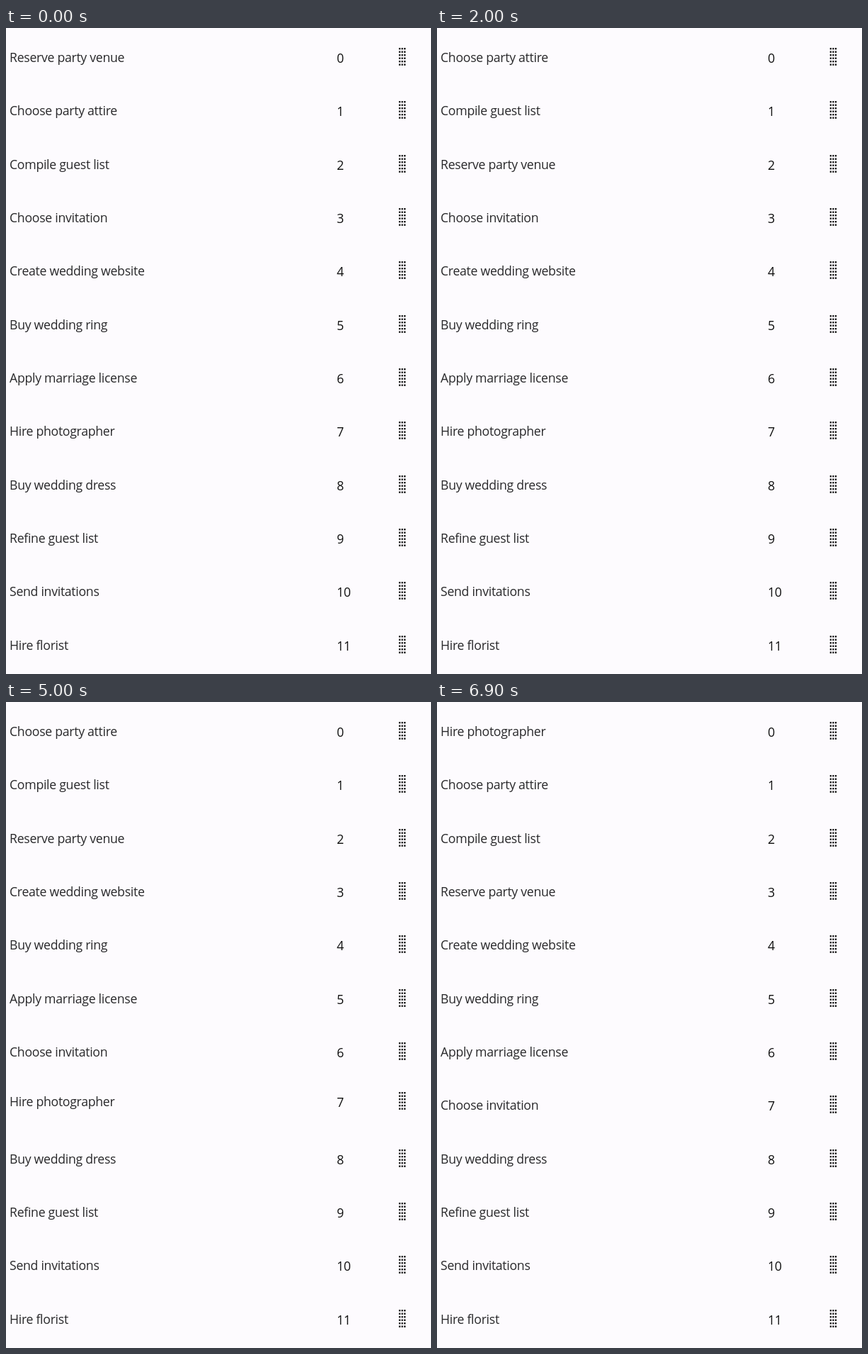
An HTML page with a canvas for the animation above (7600 ms loop, 600x911 px).

```html
<!DOCTYPE html>
<html lang="en">
<head>
<meta charset="utf-8">
<title>Reorderable task list</title>
<style>
  html, body { margin: 0; width: 100%; height: 100%; overflow: hidden; background: #fdfbfe; }
  canvas { display: block; }
</style>
</head>
<body>
<canvas id="stage" width="600" height="911"></canvas>
<script>
const ctx = document.getElementById('stage').getContext('2d');
const LOOP = 7600, TICK = 100, SHIFT_MS = 200;
const TOP = 42, PITCH = 75.32, LIFT = -5;

const TASKS = [
  'Reserve party venue', 'Choose party attire', 'Compile guest list',
  'Choose invitation', 'Create wedding website', 'Buy wedding ring',
  'Apply marriage license', 'Hire photographer', 'Buy wedding dress',
  'Refine guest list', 'Send invitations', 'Hire florist'
];

// path: row centre at each tick from `move`; swaps: when each neighbour gives way
const DRAGS = [
  { from: 0, dir: 1, lift: 1000, move: 1200, drop: 2000,
    path: [62, 98, 130, 154, 172, 185, 194, 198.5],
    swaps: [1250, 1510] },
  { from: 3, dir: 1, lift: 2700, move: 3100, drop: 3900,
    path: [285, 314, 352, 395, 430, 454, 465, 468.5],
    swaps: [3180, 3370, 3642] },
  { from: 7, dir: -1, lift: 5000, move: 5200, drop: 6900,
    path: [542, 495, 412, 352, 318, 241, 192, 150, 128, 112, 98, 86, 74, 64, 55, 48],
    swaps: [5225, 5350, 5450, 5663, 5700, 5850, 6350] }
];

const rowY = slot => TOP + slot * PITCH;

function ease(p) {
  const s = Math.min(1, Math.max(0, p));
  return s * s * (3 - 2 * s);
}

function dragY(drag, t) {
  if (t < drag.move) return rowY(drag.from) + LIFT;
  const step = Math.floor((t - drag.move) / TICK);
  return drag.path[Math.min(step, drag.path.length - 1)];
}

function layout(t) {
  const order = TASKS.slice();
  let active = null;
  for (const drag of DRAGS) {
    if (t >= drag.drop) {
      const [task] = order.splice(drag.from, 1);
      order.splice(drag.from + drag.dir * drag.swaps.length, 0, task);
    } else if (t >= drag.lift) {
      active = drag;
    }
  }
  const rows = order.map((task, i) => ({ task, number: i, y: rowY(i) }));
  if (active) {
    const { from, dir, swaps } = active;
    rows[from].y = dragY(active, t);
    swaps.forEach((start, k) => {
      rows[from + dir * (k + 1)].y -= dir * PITCH * ease((t - start) / SHIFT_MS);
    });
  }
  return rows;
}

function drawHandle(y) {
  const top = Math.round(y) - 14;
  for (let col = 0; col < 3; col++) {
    for (let row = 0; row < 6; row++) {
      ctx.fillRect(554.7 + col * 3.6, top + row * 4.5, 2.2, 2.4);
    }
  }
}

function drawRow({ task, number, y }) {
  ctx.fillStyle = '#29292b';
  ctx.fillText(task, 5, y + 6);
  ctx.fillStyle = '#111';
  ctx.fillText(number, 467, y + 7);
  drawHandle(y);
}

function frame(now) {
  const t = Math.floor((now % LOOP) / TICK) * TICK;
  ctx.fillStyle = '#fdfbfe';
  ctx.fillRect(0, 0, 600, 911);
  ctx.font = '17.7px "Open Sans", "Noto Sans", sans-serif';
  ctx.letterSpacing = '-0.3px';
  ctx.textBaseline = 'alphabetic';
  layout(t).forEach(drawRow);
  requestAnimationFrame(frame);
}

requestAnimationFrame(frame);
</script>
</body>
</html>
```
